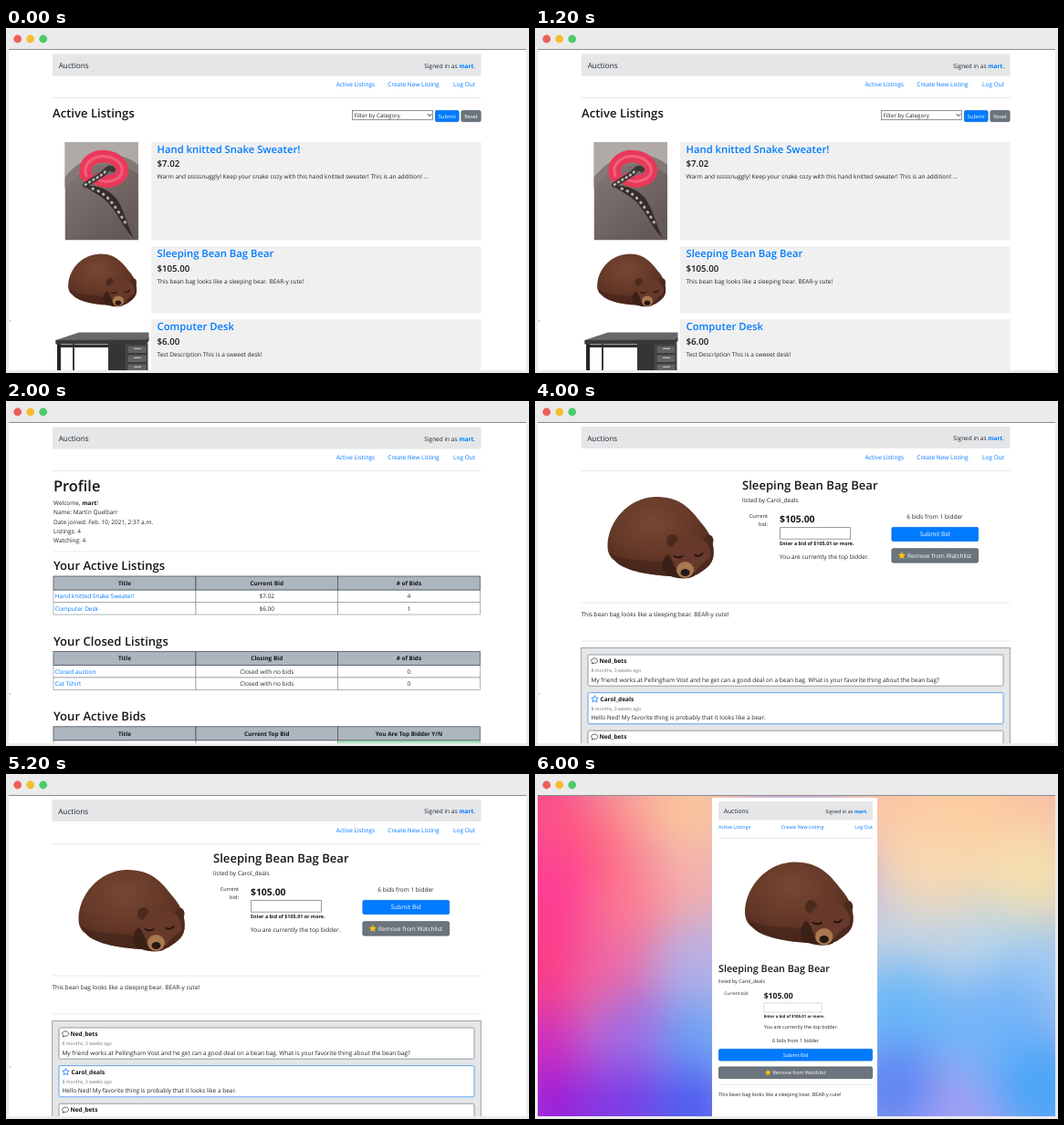
Recreate the animation shown at these times as an HTML page. Size 573 by 378 pixels, loop 8000 ms.

```html
<!DOCTYPE html>
<html lang="en">
<head>
<meta charset="utf-8">
<title>Auctions</title>
<style>
html, body { margin: 0; width: 100%; height: 100%; overflow: hidden; background: #fff; }
svg { display: block; width: 100%; height: 100%; }
text { font-family: "Open Sans", "Noto Sans", sans-serif; fill: #212529; text-rendering: geometricPrecision; white-space: pre; }
.semi { font-weight: 600; fill: #14171a; }
.bold { font-weight: 700; fill: #14171a; }
.link { fill: #007bff; }
.white { fill: #fff; }
.muted { fill: #6c757d; }
</style>
</head>
<body>
<svg id="stage" viewBox="0 0 573 378"></svg>
<script>
const USER = "mart", SELLER = "Carol_deals", BUYER = "Ned_bets";
const BLUE = "#007bff", GRAY = "#6c757d";
const SCENE_MS = 2000;

const text = (x, y, size, str, cls = "", anchor = "start") =>
  `<text x="${x}" y="${y}" font-size="${size}" class="${cls}" text-anchor="${anchor}">${str}</text>`;
const rect = (x, y, x2, y2, fill, extra = "") =>
  `<rect x="${x}" y="${y}" width="${x2 - x}" height="${y2 - y}" fill="${fill}" ${extra}/>`;
const box = (x, y, x2, y2, fill, stroke, width = 0.8, r = 0) =>
  rect(x, y, x2, y2, fill, `stroke="${stroke}" stroke-width="${width}" rx="${r}"`);
const rule = (x, x2, y) => rect(x, y - 0.4, x2, y + 0.4, "#e3e3e3");
const path = (d, fill, extra = "") => `<path d="${d}" fill="${fill}" ${extra}/>`;
const curve = (d, color, width, extra = "") =>
  path(d, "none", `stroke="${color}" stroke-width="${width}" stroke-linecap="round" ${extra}`);
const oval = (x, y, rx, ry, fill, extra = "") =>
  `<ellipse cx="${x}" cy="${y}" rx="${rx}" ry="${ry}" fill="${fill}" ${extra}/>`;

function star(x, y, r, fill, stroke = "none") {
  const pts = Array.from({ length: 10 }, (_, i) => {
    const a = i * Math.PI / 5 - Math.PI / 2, d = i % 2 ? r * 0.48 : r;
    return (x + d * Math.cos(a)).toFixed(2) + "," + (y + d * Math.sin(a)).toFixed(2);
  });
  return `<polygon points="${pts.join(" ")}" fill="${fill}" stroke="${stroke}" stroke-width=".8" stroke-linejoin="round"/>`;
}

const bubble = (x, y) =>
  path(`M${x - 2.2} ${y + 1.8} L${x - 3.3} ${y + 3.2} L${x - 0.6} ${y + 2.5}
    C${x + 4.5} ${y + 3} ${x + 4.5} ${y - 3} ${x} ${y - 2.8}
    C${x - 4.3} ${y - 2.8} ${x - 4.3} ${y + 0.6} ${x - 2.2} ${y + 1.8}Z`,
    "#fff", 'stroke="#343a40" stroke-width=".8"');

const signedIn = (x, y, size) =>
  text(x, y, size, `Signed in as <tspan class="link bold">${USER}</tspan>.`, "", "end");

function header(x, y) {
  return rect(x, y, 520.5, y + 24, "#e4e6e8") +
    text(x + 6.7, y + 15.5, 8.2, "Auctions") + signedIn(514, y + 14.9, 6.5) +
    text(383, 64, 6.5, "Active Listings", "link", "middle") +
    text(446.5, 64, 6.5, "Create New Listing", "link", "middle") +
    text(514, 64, 6.5, "Log Out", "link", "end") + rule(x, 520.5, 76.5);
}

function bear(x, y, scale) {
  return `<g transform="translate(${x} ${y}) scale(${scale})">` +
    path("M1 55C1 29 23 2 53 1C80 0 93 15 104 30C114 41 119 55 117 66C114 77 105 81 97 87C91 92 78 91 70 88C50 87 20 83 9 71C3 67 1 61 1 55Z", "url(#fur)") +
    path("M3 62C22 74 46 68 64 74L72 88C50 87 20 83 9 71Z", "#43241a", 'opacity=".6"') +
    oval(72, 49, 6.5, 7, "#4b2a1d") + oval(112, 49, 5, 6.5, "#4b2a1d") +
    oval(92, 64, 22, 20, "#66392a") +
    path("M67 64C75 72 74 83 80 90L66 87C58 79 60 69 67 64Z", "#3b2018") +
    path("M99 80C108 70 115 69 117 64C117 76 107 81 98 87Z", "#4b291d") +
    curve("M74 66Q79 69 83 66M97 65Q102 67 105 63", "#24130f", 2) +
    oval(86, 81, 9.5, 9, "#a87850") + oval(86, 84, 5, 4, "#241815") + "</g>";
}

function snakePhoto() {
  const sweater = "M88 162C83 146 99 139 111 141C130 144 133 163 117 167C111 169 105 168 101 166";
  return `<g clip-path="url(#photo)">` + rect(64.5, 125, 145, 232.5, "url(#sofa)") +
    path("M64 125H145V150C122 132 88 134 64 164Z", "#b0aaa7") +
    path("M64 164C88 134 122 132 145 150V160C120 143 90 146 64 175Z", "#857976") +
    curve(sweater, "#e8395a", 13.5) + curve(sweater, "#f2607a", 3) +
    curve("M87 172C96 165 104 163 109 157C112 153 115 153 117 155", "#3b3634", 6) +
    curve("M87 172C96 165 104 163 109 157", "#c3beb5", 2.5, 'stroke-dasharray="1 4"') +
    path("M86 173C101 171 116 178 123 190C131 204 134 220 140 230C130 222 124 206 114 194C106 184 96 181 86 173Z", "#332e2c") +
    curve("M95 176C113 182 121 198 133 217", "#b9b4a9", 3, 'stroke-dasharray=".5 6"') + "</g>";
}

function desk() {
  let s = rect(56, 346, 60, 375, "#252527") + rect(73, 346, 75, 375, "#3b3b3d") +
    rect(60, 347, 113, 350, "#2f2f31") + rect(112, 346, 131, 375, "#353538") +
    rect(131, 345, 155.5, 375, "#4b4a4c") +
    path("M54.5 342L80 333.5H156.5V340L153 346H54.5Z", "#69666a") +
    path("M54.5 342L154 341.5 156.5 339V343L153 346.5H54.5Z", "#39383b");
  for (const y of [348, 358, 368])
    s += box(133, y, 154, y + 8.5, "#656264", "#2d2c2e", 0.7) + rect(140, y + 2.7, 148, y + 3.9, "#c2c1c1");
  return s;
}

function listing(y, y2, title, price, info) {
  return rect(159, y, 520.5, y2, "#f0f0f0") +
    text(165.5, y + 11.8, 11.27, title, "semi link") +
    text(165.5, y + 27.6, 9.7, price, "semi") + text(165.5, y + 40.5, 6.5, info);
}

const plate = (x, y, x2, y2, fill, edge) =>
  box(x + 0.4, y + 0.4, x2 - 0.4, y2 - 0.4, fill, edge, 0.8, 1.6);

function button(x, y, x2, y2, label, size, gray) {
  return plate(x, y, x2, y2, gray ? GRAY : BLUE, gray ? "#5b636b" : "#0a6fe0") +
    text((x + x2) / 2, (y + y2) / 2 + size * 0.36, size, label, "white", "middle");
}

function watchButton(x, y, x2, y2, size) {
  const mid = (x + x2) / 2, cy = (y + y2) / 2;
  return plate(x, y, x2, y2, GRAY, "#555c63") +
    star(mid - size * 5.6, cy, size * 0.66, "#ffc107") +
    text(mid + size * 0.75, cy + size * 0.36, size, "Remove from Watchlist", "white", "middle");
}

function listingsPage() {
  return header(51, 28.6) + text(51, 98, 13.1, "Active Listings", "semi") +
    box(379.4, 90.4, 467.4, 100.4, "#fff", "#767676") +
    text(381.5, 97.7, 6.2, "Filter by Category") +
    curve("M462 94.5L464 96.6L466 94.5", "#222", 1) +
    button(470, 90, 496.5, 103, "Submit", 5.7) +
    button(498.5, 90, 520.5, 103, "Reset", 5.7, true) +
    listing(124.8, 232.5, "Hand knitted Snake Sweater!", "$7.02",
      "Warm and sssssnuggly! Keep your snake cozy with this hand knitted sweater! This is an addition! ...") +
    listing(239.5, 312.5, "Sleeping Bean Bag Bear", "$105.00",
      "This bean bag looks like a sleeping bear. BEAR-y cute!") +
    listing(319.5, 376, "Computer Desk", "$6.00", "Test Description This is a sweeet desk!") +
    snakePhoto() + bear(67.5, 247, 0.645) + desk();
}

function table(y, title, heads, rows) {
  const cols = [52, 208, 363.5, 519.3];
  let s = text(52, y - 6.7, 13.1, title, "semi");
  rows.forEach((row, r) => row.forEach((cell, c) => {
    const top = y + 15 + r * 13.5;
    s += box(cols[c], top, cols[c + 1], top + 13.5, cell === "Yes" ? "#a9e8c0" : "#fff", "#90959b", 0.7) +
      (c ? text((cols[c] + cols[c + 1]) / 2, top + 9, 6.5, cell, "", "middle")
         : text(53.8, top + 9, 6.5, cell, "link"));
  }));
  heads.forEach((head, c) => {
    s += box(cols[c], y, cols[c + 1], y + 15, "#adb5bf", "#4c5560") +
      text((cols[c] + cols[c + 1]) / 2, y + 9.8, 6.4, head, "bold", "middle");
  });
  return s;
}

function profilePage() {
  const lines = [`Welcome, <tspan class="bold">${USER}</tspan>!`, "Name: Martin Quelbarr",
    "Date joined: Feb. 10, 2021, 2:37 a.m.", "Listings: 4", "Watching: 4"];
  return header(51, 28.6) + text(52, 98.8, 16.4, "Profile", "semi") +
    lines.map((line, i) => text(52, 114 + i * 10.25, 6.5, line)).join("") +
    rule(52, 519.5, 165) +
    table(192, "Your Active Listings", ["Title", "Current Bid", "# of Bids"],
      [["Hand knitted Snake Sweater!", "$7.02", "4"], ["Computer Desk", "$6.00", "1"]]) +
    table(274.5, "Your Closed Listings", ["Title", "Closing Bid", "# of Bids"],
      [["Closed auction", "Closed with no bids", "0"], ["Cat Tshirt", "Closed with no bids", "0"]]) +
    table(356.8, "Your Active Bids", ["Title", "Current Top Bid", "You Are Top Bidder Y/N"],
      [["Sleeping Bean Bag Bear", "$105.00", "Yes"]]);
}

function comment(y, name, body, seller) {
  return box(58, y, 513, y + 34.2, "#fff", seller ? "#4a9be8" : "#8b9095", 0.9, 1.6) +
    (seller ? star(65.5, y + 7, 3.9, "#fff", BLUE) : bubble(65.3, y + 6.7)) +
    text(seller ? 71.5 : 70.5, y + 9.2, 6.5, name, "bold") +
    text(61.5, y + 19.3, 5.15, "8 months, 3 weeks ago", "muted") +
    text(61.5, y + 29.7, 6.5, body);
}

function itemPage() {
  return header(50.5, 28) + bear(78.5, 104, 1) +
    text(227, 97.3, 13.1, "Sleeping Bean Bag Bear", "semi") +
    text(227, 111, 6.5, `listed by ${SELLER}`) +
    text(255, 128, 5.7, "Current", "", "end") + text(255, 136.6, 5.7, "bid:", "", "end") +
    text(268, 132.6, 10.4, "$105.00", "bold") +
    box(268.4, 138.6, 345.4, 151.2, "#fff", "#858585") +
    text(268, 157.6, 5.4, "Enter a bid of $105.01 or more.", "bold") +
    text(268, 173, 6.5, "You are currently the top bidder.") +
    text(438, 128.5, 6.5, "6 bids from 1 bidder", "", "middle") +
    button(390.5, 138, 486, 154, "Submit Bid", 6.5) +
    watchButton(390.5, 161.3, 486, 177.5, 6.5) +
    rule(50.5, 520.5, 221) +
    text(50.5, 236, 6.55, "This bean bag looks like a sleeping bear. BEAR-y cute!") +
    rule(50.5, 520.5, 263) + box(50.7, 270.4, 520.3, 380, "#e4e6e8", "#8b9095") +
    comment(278, BUYER, "My friend works at Pellingham Vost and he get can a good deal on a bean bag. What is your favorite thing about the bean bag?") +
    comment(319.6, SELLER, "Hello Ned! My favorite thing is probably that it looks like a bear.", true) +
    comment(361.2, BUYER, "");
}

function wallpaper() {
  const blobs = [
    ["#f8488c", 0, 25, 60], ["#fd5c80", 60, 70, 55], ["#fb9690", 115, 35, 45], ["#fcc49c", 175, 35, 55],
    ["#fd3f94", 5, 135, 65], ["#fc7a8e", 110, 135, 50], ["#f5b0aa", 175, 125, 45], ["#fb3a86", 10, 215, 60],
    ["#ee68a4", 90, 220, 50], ["#b4b0e6", 175, 210, 50], ["#cc2cbc", 5, 310, 55], ["#a06ae2", 110, 290, 50],
    ["#68a4f4", 180, 290, 45], ["#9a1cd8", 20, 375, 50], ["#7c38e6", 95, 370, 50], ["#4c5cf0", 175, 370, 50],
    ["#fbc7a2", 395, 35, 60], ["#fdcda0", 485, 35, 60], ["#fbc0a0", 560, 30, 50],
    ["#f8d8b0", 430, 110, 55], ["#f5dfae", 545, 115, 60], ["#c6d4e2", 395, 185, 50], ["#bcd6e8", 490, 190, 50],
    ["#a0caf2", 560, 215, 55], ["#68b8f8", 400, 265, 60], ["#74b4f8", 510, 280, 65], ["#5c84f2", 395, 350, 55],
    ["#4aa5f8", 560, 350, 60], ["#a4a0f4", 468, 375, 45]
  ];
  return rect(3, 23, 570, 375, "#c9b4dc") + `<g filter="url(#soft)">` +
    blobs.map(([c, x, y, r]) => oval(x, y, r, r, c)).join("") + "</g>";
}

function mobilePage() {
  return wallpaper() + rect(194, 26, 375, 375, "#fff") +
    rect(201, 30, 370, 50.5, "#e4e6e8") + text(206.7, 43.2, 6.75, "Auctions") + signedIn(364.5, 42.7, 5.4) +
    text(201, 59.6, 5.4, "Active Listings", "link") +
    text(293, 59.6, 5.4, "Create New Listing", "link", "middle") +
    text(370, 59.6, 5.4, "Log Out", "link", "end") +
    rule(201, 370, 70.3) + bear(229, 95.5, 1.02) +
    text(201, 217.3, 10.75, "Sleeping Bean Bag Bear", "semi") +
    text(201, 229, 5.4, `listed by ${SELLER}`) +
    text(234, 242, 4.8, "Current bid:", "", "end") +
    text(250.7, 246, 8.6, "$105.00", "bold") +
    box(251, 251, 314, 261, "#fff", "#c8c8c8", 0.7) +
    text(250.7, 266.6, 4.4, "Enter a bid of $105.01 or more.", "bold") +
    text(250.7, 279, 5.4, "You are currently the top bidder.") +
    text(285.5, 293.6, 5.4, "6 bids from 1 bidder", "", "middle") +
    button(201, 301, 370, 314.5, "Submit Bid", 5.4) +
    watchButton(201, 320.5, 370, 334, 5.4) + rule(201, 370, 340.3) +
    text(201, 352.6, 5.45, "This bean bag looks like a sleeping bear. BEAR-y cute!");
}

const defs = `<defs>
  <radialGradient id="fur" cx=".42" cy=".3" r=".75"><stop offset="0" stop-color="#784733"/><stop offset=".6" stop-color="#623626"/><stop offset="1" stop-color="#46251a"/></radialGradient>
  <linearGradient id="sofa" x2=".6" y2="1"><stop offset="0" stop-color="#8a7e7d"/><stop offset="1" stop-color="#655a58"/></linearGradient>
  <clipPath id="photo"><rect x="64.5" y="125" width="80.5" height="107.5"/></clipPath>
  <filter id="soft" filterUnits="userSpaceOnUse" x="-140" y="-140" width="860" height="660" color-interpolation-filters="sRGB"><feGaussianBlur stdDeviation="25"/></filter>
</defs>`;

const tick = rect(4, 320, 5, 322, "#b5b5b5");
const pages = [listingsPage() + tick, profilePage() + tick, itemPage() + tick, mobilePage()];
const chrome = rect(0, 0, 573, 23, "#ebebeb") + rect(0, 23, 3, 378, "#ebebeb") +
  rect(570, 23, 573, 378, "#ebebeb") + rect(0, 375, 573, 378, "#ebebeb") + rect(3, 23, 570, 24, "#8c8c8c") +
  ["#ed5f57", "#f5bd30", "#4ccb6c"].map((c, i) => oval(12.7 + i * 14, 12, 4.4, 4.4, c)).join("");

const stage = document.getElementById("stage");
stage.innerHTML = defs + pages.map(p => `<g class="page">${p}</g>`).join("") + chrome;
const groups = [...stage.querySelectorAll(".page")];

function draw(ms) {
  const current = Math.floor(ms / SCENE_MS) % groups.length;
  groups.forEach((g, i) => g.style.display = i === current ? "" : "none");
}

const start = performance.now();
function loop() {
  draw(performance.now() - start);
  requestAnimationFrame(loop);
}
draw(0);
requestAnimationFrame(loop);
</script>
</body>
</html>
```
